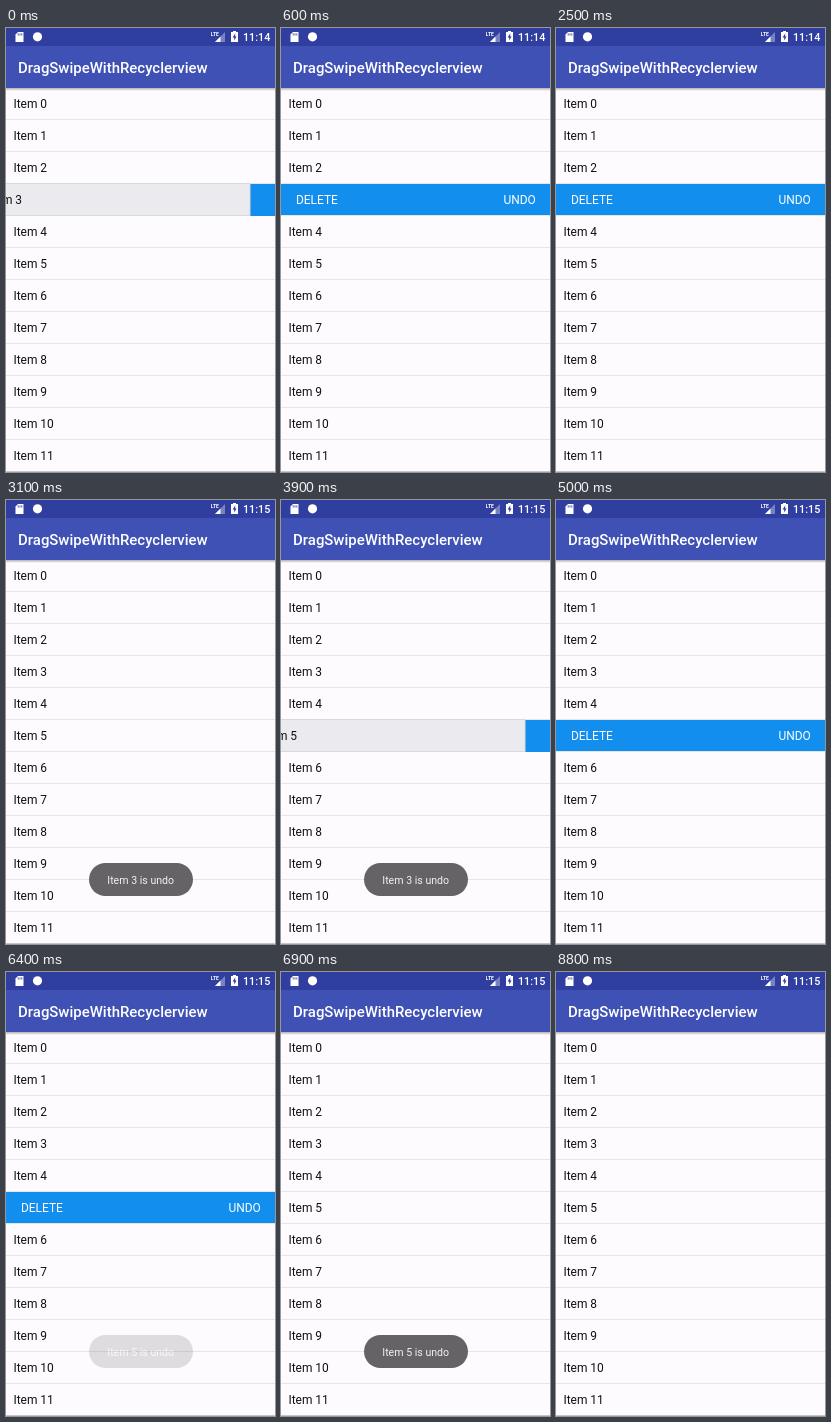
Recreate the animation shown at these times as an HTML page. Size 269 px wide and 444 px high, loop 8.9 s.

```html
<!DOCTYPE html>
<html lang="en">
<head>
<meta charset="utf-8">
<title>Swipe list</title>
<style>
  html, body { margin: 0; width: 100%; height: 100%; overflow: hidden; background: #fdfbfe; }
  svg { display: block; width: 100vw; height: 100vh; }
  text { font-family: Roboto, sans-serif; font-size: 11.96px; fill: #111; white-space: pre; }
  .light text, text.light { fill: #fff; }
  .title { font-size: 14.95px; font-weight: 500; }
  .clock { font-size: 10.8px; font-weight: 500; text-anchor: end; }
  .lte { font-size: 5px; font-weight: 700; }
  .toast text { font-size: 10.6px; fill: #f2f1f2; text-anchor: middle; }
</style>
</head>
<body>
<svg id="stage" viewBox="0 0 269 444">
  <defs>
    <linearGradient id="shade" x1="0" y1="0" x2="0" y2="1">
      <stop offset="0" stop-color="#000" stop-opacity=".3"/>
      <stop offset="1" stop-color="#000" stop-opacity="0"/>
    </linearGradient>
  </defs>
  <rect width="269" height="444" fill="#fdfbfe"/>
  <g id="list"></g>
  <rect y="443" width="269" height="1" fill="#c4c3c5"/>

  <rect y="60" width="269" height="3" fill="url(#shade)"/>
  <rect y="17" width="269" height="43" fill="#3f51b5"/>
  <rect width="269" height="18" fill="#303f9f"/>
  <text class="title light" x="12" y="45">DragSwipeWithRecyclerview</text>

  <g fill="#fff">
    <path d="M12 4H17.5V14H9.5V6.5Z"/>
    <path d="M12.2 5.3V7.6M14 5.3V7.6M15.8 5.3V7.6" stroke="#303f9f" stroke-width=".8"/>
    <circle cx="31.5" cy="8.8" r="4.6"/>
    <path d="M219 4V14H209Z" opacity=".35"/>
    <path d="M214.5 8.5V14H209Z"/>
    <path d="M227 3H230V4H232V14H225V4H227Z"/>
    <path d="M229.2 5.5L226.6 9.6H228.2V12.6L230.6 8.4H229.2Z" fill="#303f9f"/>
  </g>
  <text class="lte light" x="204.7" y="8">LTE</text>
  <text id="clock" class="clock light" x="264.3" y="13"></text>

  <g id="toast" class="toast">
    <rect x="83" y="363" width="104" height="33" rx="16.5" fill="#656366"/>
    <text id="message" x="134.7" y="383.7"></text>
  </g>
</svg>
<script>
const LOOP = 8900, STEP = 100, WIDTH = 269, PITCH = 32;
const BLUE = '#118eee';
const $ = id => document.getElementById(id);

// One entry per swiped row: touch, release, and tap on undo
const swipes = [
  { row: 3, press: -300, go: 0, undo: 2600 },
  { row: 5, press: 3750, go: 4000, undo: 6400 }
];

function add(parent, tag, attrs = {}, text = '') {
  const node = document.createElementNS('http://www.w3.org/2000/svg', tag);
  for (const key in attrs) node.setAttribute(key, attrs[key]);
  node.textContent = text;
  parent.appendChild(node);
  return node;
}

const rows = Array.from({ length: 12 }, (_, i) => {
  const g = add($('list'), 'g', { transform: `translate(0 ${60 + PITCH * i})` });
  add(g, 'rect', { y: 31, width: WIDTH, height: 1, fill: '#e6e5e8' });
  const under = add(g, 'rect', { width: WIDTH, height: 32, fill: BLUE });
  const actions = add(g, 'g', { class: 'light' });
  add(actions, 'rect', { width: WIDTH, height: 31, fill: BLUE });
  add(actions, 'text', { x: 14.9, y: 20.3 }, 'DELETE');
  add(actions, 'text', { x: 222.4, y: 20.3 }, 'UNDO');
  const item = add(g, 'g');
  const pressed = add(item, 'rect', { y: -.5, width: WIDTH, height: 32, fill: '#ebeaee', stroke: '#d9d8dc', 'stroke-width': 1 });
  add(item, 'text', { x: 7.4, y: 20.3 }, 'Item ' + i);
  return { under, actions, item, pressed };
});

const ramp = (t, from, to) => Math.min(1, Math.max(0, (t - from) / (to - from)));
const fade = (node, value) => node.setAttribute('opacity', value);

function drawRow(row, { sliding = false, x = 0, actions = 0 } = {}) {
  fade(row.under, sliding ? 1 : 0);
  fade(row.pressed, sliding ? 1 : 0);
  fade(row.actions, actions);
  row.item.setAttribute('transform', `translate(${x} 0)`);
  fade(row.item, 1 - actions);
}

function draw(t) {
  let toast = 0;
  for (const { row, press, go, undo } of swipes) {
    const settle = go + 200;
    const swapIn = settle + (go ? 0 : 100);
    const sliding = t >= press && t <= swapIn;
    const swiped = t > swapIn && t < undo;
    const x = -25 * ramp(t, press, press + 150) - 244 * ramp(t, go, settle);
    const shown = ramp(t, swapIn, swapIn + 300) * (1 - ramp(t, undo, undo + 300));
    drawRow(rows[row], { sliding, x: sliding || swiped ? x : 0, actions: shown });
    if (swiped) fade(rows[row].item, 0);

    const alpha = ramp(t, undo - 70, undo + 280) * (1 - ramp(t, undo + 2050, undo + 2400));
    if (t >= undo && alpha > 0) {
      toast = alpha;
      $('message').textContent = `Item ${row} is undo`;
    }
  }
  fade($('toast'), toast);
  $('clock').textContent = t < 3000 ? '11:14' : '11:15';
}

rows.forEach(row => drawRow(row));
const start = performance.now();
function tick() {
  const t = (performance.now() - start) % LOOP;
  draw(Math.floor(t / STEP) * STEP);
  requestAnimationFrame(tick);
}
tick();
</script>
</body>
</html>
```
